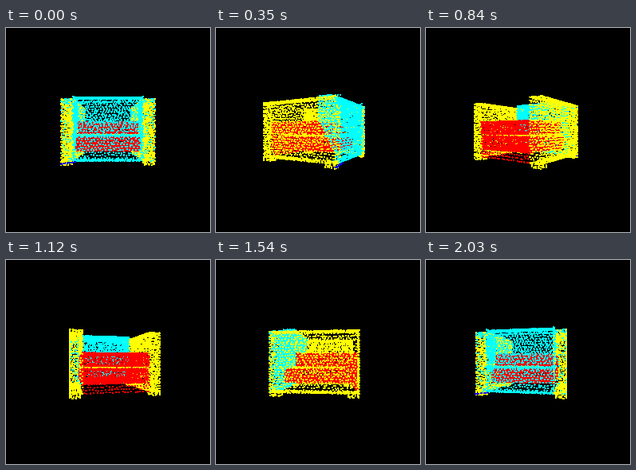
A matplotlib script for the animation above (2.1 s loop, 256 px wide and 256 px high).

```python
import numpy as np
import matplotlib.pyplot as plt
from matplotlib.animation import FuncAnimation

SIZE, FRAMES, STEP_MS = 256, 30, 70
CAMERA = 227
W, D, TOP, BOTTOM = 47, 45, 31, -31   # half width, half depth, arm top and bottom
IN = 35                               # inner side of the arms
YELLOW, CYAN, RED, BLUE = (1, 1, 0), (0, 1, 1), (1, 0, 0), (0, 0, 1)

rng = np.random.default_rng(4)
clouds, tints = [], []


def face(corner, u, v, color, gap=3.0, mix=None, share=0.0):
    """Scatter evenly spaced points over the parallelogram corner + a*u + b*v."""
    corner, u, v = (np.array(p, float) for p in (corner, u, v))
    nu = max(2, round(np.linalg.norm(u) / gap) + 1)
    nv = max(2, round(np.linalg.norm(v) / (gap * 0.9)) + 1)
    a, b = np.meshgrid(np.arange(nu), np.arange(nv))
    a = a + 0.5 * (b % 2) + rng.uniform(-0.28, 0.28, a.shape)
    b = b + rng.uniform(-0.28, 0.28, b.shape)
    a = np.clip(a / (nu - 0.5), 0, 1).ravel()[:, None]
    b = np.clip(b / (nv - 1), 0, 1).ravel()[:, None]
    tint = np.tile(np.array(color, float), (len(a), 1))
    if mix is not None:
        tint[rng.random(len(a)) < share] = mix
    clouds.append(corner + a * u + b * v)
    tints.append(tint)


def box(x, y, z, color, gap=3.0):
    """Hollow box from three (low, high) ranges."""
    lo = np.array([x[0], y[0], z[0]], float)
    hi = np.array([x[1], y[1], z[1]], float)
    edges = np.diag(hi - lo)
    for i, j in ((0, 1), (0, 2), (1, 2)):
        face(lo, edges[i], edges[j], color, gap)
        face(hi, -edges[i], -edges[j], color, gap)


def arm(side):
    height, depth = (0, TOP - BOTTOM, 0), (0, 0, 2 * D)
    thick = (side * (W - IN), 0, 0)
    face((side * W, BOTTOM, -D), depth, height, YELLOW)
    face((side * IN, 9, -D), (0, 0, 65), (0, TOP - 9, 0), YELLOW, 4)
    for y in (BOTTOM, TOP):
        face((side * IN, y, -D), depth, thick, YELLOW)
    face((side * IN, BOTTOM, -D), thick, height, YELLOW)
    face((side * IN, BOTTOM, D), thick, height, YELLOW, mix=CYAN, share=0.45)
    face((side * IN, TOP, D), thick, (0, -2, 0), CYAN)
    for z in (-D, D - 10):
        x = sorted((side * (IN + 2), side * W))
        box(x, (-35, BOTTOM), (z, z + 10), YELLOW, 4.5)


def sofa():
    arm(-1)
    arm(1)
    across = (2 * IN, 0, 0)
    # back rest: rear panel and a leaning cushion
    face((-IN, BOTTOM, D), across, (0, TOP - BOTTOM, 0), CYAN)
    face((-IN, BOTTOM, D - 8), across, (0, 0, 8), CYAN)
    face((-IN, 9, 22), across, (0, 24, -2), CYAN, 3.3)
    face((-IN, 9, 22), across, (0, -17, 12), CYAN, 5)
    face((-IN, 35, 22), across, (0, 0, 12), CYAN, 2.7)
    face((-IN, 32, 20), across, (0, 3, 2), CYAN, 2.7)
    face((-IN, 35, 34), across, (0, -4, 11), CYAN, 2.7)
    for x in (-IN, IN):
        face((x, 9, 21), (0, 0, 24), (0, 25, 0), CYAN, 2.6)
        face((x, -28, 43), (0, 37, -20), (0, 0, 2), CYAN, 2.6)
        face((x, -8, 32), (0, 0, 13), (0, 17, -6), CYAN, 2.6)
    # seat cushion, base and front panel
    box((-IN + 1, IN - 1), (-4, 9), (-D, 20), RED)
    box((-IN + 1, IN - 1), (-22, -8), (-D + 2, 32), RED, 3.3)
    face((-IN, BOTTOM, -D), across, (0, 40, 0), RED, 3.3)
    face((-IN, -6, -30), across, (0, 0, 58), YELLOW, 5)
    face((-IN, -6, 28), across, (0, 0, 16), CYAN, 3.6)
    # dark specks under one rear foot
    face((-W, -34, D + 0.5), (14, 2, 0), (0, 0, 1), BLUE, 4)


def project(frame):
    angle = 2 * np.pi * frame / FRAMES
    c, s = np.cos(angle), np.sin(angle)
    x, y, z = points.T
    depth = z * c - x * s
    scale = 1 / (1 - depth / CAMERA)
    xy = np.column_stack((x * c + z * s, -y)) * scale[:, None] + SIZE / 2
    order = np.argsort(depth)
    return xy[order], colors[order]


sofa()
points, colors = np.vstack(clouds), np.vstack(tints)

fig = plt.figure(figsize=(2.56, 2.56), dpi=100, facecolor="black")
ax = fig.add_axes([0, 0, 1, 1])
ax.set_xlim(0, SIZE)
ax.set_ylim(SIZE, 0)
ax.axis("off")

start_xy, start_colors = project(0)
dots = ax.scatter(*start_xy.T, s=0.75, c=start_colors, marker="o",
                  linewidths=0, antialiased=False)


def update(frame):
    xy, tint = project(frame)
    dots.set_offsets(xy)
    dots.set_facecolor(tint)
    return (dots,)


anim = FuncAnimation(fig, update, frames=FRAMES, interval=STEP_MS,
                     repeat=True, repeat_delay=0, blit=False)
plt.show()
```
